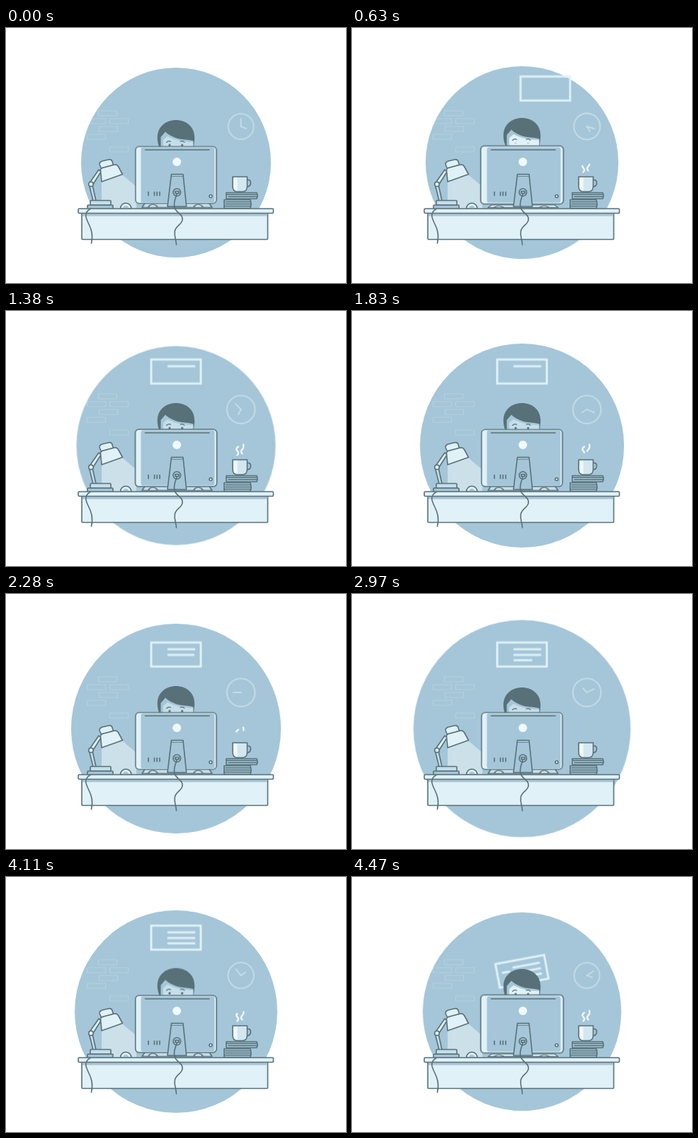
An HTML page for the animation above (4.5 s loop, 480 by 360 pixels).

```html
<!DOCTYPE html>
<html lang="en">
<head>
<meta charset="utf-8">
<title>Working at the desk</title>
<style>
  html, body { margin: 0; width: 100%; height: 100%; overflow: hidden; background: #fff; }
  svg { display: block; width: 100vw; height: 100vh; }
  svg * { transform-origin: 0 0; }

  .blue { fill: #a4c6d8; }
  .pale { fill: #e0f1f8; }
  .dark { fill: #587078; }
  .mid { fill: #c5deea; }
  .line { stroke: #587078; stroke-width: 1.6; stroke-linecap: round; stroke-linejoin: round; }
  .thin { stroke-width: 1.1; }
  .open { fill: none; }
  .bricks { fill: none; stroke: #fff; stroke-opacity: .2; stroke-width: 1.2; }
  .dial { fill: none; stroke: #c6deea; stroke-width: 1.8; stroke-linecap: round; }
  .paper { fill: none; stroke: #e0f1f8; stroke-width: 3; stroke-linecap: round; }
  .steam { fill: none; stroke: #eef8fc; stroke-width: 2.4; stroke-linecap: round; }

  .disc, .ring, .minute, .hour, .paper, .row, .note, .head, .face, .eyes, .shell, .feet, .steam path {
    animation: 4.5s linear infinite;
  }
  .disc { animation-name: swell; }
  .ring { animation-name: ring; }
  .minute { animation-name: minute; }
  .hour { animation-name: hour; }
  .paper { animation-name: hang; }
  .row { animation-name: row1; }
  .row.b { animation-name: row2; }
  .row.c { animation-name: row3; }
  .note { animation-name: note; }
  .head { animation-name: bob; }
  .face { animation-name: glow; }
  .eyes { animation-name: blink; }
  .shell { animation-name: stretch; }
  .feet { animation-name: squash; }
  .steam path { stroke-dasharray: 1 2; animation-name: rise; }

  @keyframes swell {
    0% { transform: scale(134); }
    12% { transform: scale(135.6); }
    24% { transform: scale(138.4); }
    36% { transform: scale(142.2); }
    48% { transform: scale(146.9); }
    60% { transform: scale(152.2); }
    64% { transform: scale(153.7); }
    66% { transform: scale(153.3); }
    72.7% { transform: scale(151); }
    80.7% { transform: scale(147); }
    96.7% { transform: scale(141); }
    100% { transform: scale(139.9); }
  }
  @keyframes ring {
    0% { transform: scale(.97); }
    14% { transform: scale(1); }
    30.7%, 66% { transform: scale(1.07); }
    80.7% { transform: scale(1); }
    100% { transform: scale(.97); }
  }
  @keyframes minute {
    0% { transform: rotate(0deg); }
    14% { transform: rotate(107deg); }
    30.7% { transform: rotate(316deg); }
    50.7% { transform: rotate(630deg); }
    66% { transform: rotate(783deg); }
    80.7% { transform: rotate(914deg); }
    100% { transform: rotate(1144deg); }
  }
  @keyframes hour {
    0% { transform: rotate(113deg); }
    14% { transform: rotate(150deg); }
    30.7% { transform: rotate(208deg); }
    50.7% { transform: rotate(270deg); }
    66% { transform: rotate(316deg); }
    80.7% { transform: rotate(340deg); }
    100% { transform: rotate(475deg); }
  }
  @keyframes hang {
    0%, 10% { transform: translate(70px, 0); opacity: 0; }
    12.7% { opacity: 1; }
    14% { transform: translate(33px, 0); }
    20%, 91% { transform: translate(0, 0); animation-timing-function: ease-in; }
    100% { transform: translate(0, 54px) rotate(-12deg); opacity: 1; }
  }
  @keyframes row1 {
    0%, 22% { transform: scaleX(0); opacity: 0; }
    22.1% { opacity: 1; }
    30%, 100% { transform: scaleX(1); opacity: 1; }
  }
  @keyframes row2 {
    0%, 41% { transform: scaleX(0); opacity: 0; }
    41.1% { opacity: 1; }
    51%, 100% { transform: scaleX(1); opacity: 1; }
  }
  @keyframes row3 {
    0%, 58% { transform: scaleX(0); opacity: 0; }
    58.1% { opacity: 1; }
    70%, 100% { transform: scaleX(1); opacity: 1; }
  }
  @keyframes note {
    0%, 92% { opacity: 0; }
    96%, 100% { opacity: 1; }
  }
  @keyframes bob {
    0% { transform: translateY(0); }
    14% { transform: translateY(-3px); }
    30.7%, 50.7% { transform: translateY(0); }
    66% { transform: translateY(2px); }
    80.7% { transform: translateY(-3px); }
    100% { transform: translateY(0); }
  }
  @keyframes glow {
    0%, 8% { fill: #c5deea; }
    13%, 16% { fill: #e0f1f8; }
    22%, 92% { fill: #c5deea; }
    98%, 100% { fill: #e0f1f8; }
  }
  @keyframes blink {
    0%, 12.5% { transform: scaleY(1); }
    13.5%, 14.7% { transform: scaleY(.15); }
    16%, 64.5% { transform: scaleY(1); }
    65.4%, 66.7% { transform: scaleY(.15); }
    68%, 100% { transform: scaleY(1); }
  }
  @keyframes stretch {
    0%, 6% { transform: scale(1); }
    14% { transform: scale(1.025); }
    30.7% { transform: scale(1.01); }
    42%, 90% { transform: scale(1); }
    98%, 100% { transform: scale(1.025); }
  }
  @keyframes squash {
    0%, 6% { transform: scaleY(1); }
    13%, 16% { transform: scaleY(.5); }
    22%, 92% { transform: scaleY(1); }
    98%, 100% { transform: scaleY(.5); }
  }
  @keyframes rise {
    0%, 6% { stroke-dashoffset: 1.15; opacity: 0; }
    7% { opacity: 1; }
    14% { stroke-dashoffset: .3; }
    26%, 34% { stroke-dashoffset: 0; }
    50.7% { stroke-dashoffset: -.72; opacity: 1; }
    58% { stroke-dashoffset: -1; opacity: 0; }
    72% { stroke-dashoffset: 1.15; opacity: 0; }
    73% { opacity: 1; }
    80.7% { stroke-dashoffset: .3; }
    100% { stroke-dashoffset: 0; opacity: 1; }
  }
</style>
</head>
<body>
<svg viewBox="0 0 480 360">
  <g transform="translate(240 190)"><circle class="disc blue" r="1"/></g>

  <path class="bricks" d="M130.5 117h26v7h-26zM114.5 128h26v7h-26zM146.5 128h26v7h-26zM131.5 139h26v7h-26zM114.5 150h26v7h-26zM146.5 168h26v7h-26z"/>

  <g class="dial" transform="translate(331.7 139)">
    <circle class="ring" r="18.5"/>
    <path class="minute" d="M0 0V-11"/>
    <path class="hour" d="M0 0V-8"/>
  </g>

  <g transform="translate(240 85.5)">
    <g class="paper">
      <rect x="-35" y="-17" width="70" height="34"/>
      <path class="note" d="M-27-3h9"/>
      <g transform="translate(-11 -7.5)"><path class="row" d="M0 0h37"/></g>
      <g transform="translate(-11 .5)"><path class="row b" d="M0 0h37"/></g>
      <g transform="translate(-11 8)"><path class="row c" d="M0 0h37"/></g>
    </g>
  </g>

  <!-- worker -->
  <g class="head">
    <path class="face" d="M217 146H264V175H217z"/>
    <path class="blue" d="M217 148L225 145 264 156V161Q244 161 228 153L222 158V175H217z"/>
    <path class="dark" d="M214 159C212 141 224 130 240 130S268 141 266 159L264.500 172V159.500C258 157 247 158.500 237 154Q229 150.500 225 146.500L218.500 154V172Q215 167 214 159z"/>
    <path class="line thin open" d="M226.500 161.500q3-3 6-1.200M246 160.300q3.500-1.800 6 1.200"/>
    <g transform="translate(240 165.500)">
      <g class="eyes dark"><circle cx="-9" r="1.700"/><circle cx="8.700" r="1.700"/></g>
    </g>
  </g>

  <!-- lamp and mouse -->
  <path fill="#cbe0e8" d="M135 216L164 207 184 224V255H135z"/>
  <path class="pale line" d="M161.500 255a7.700 7.700 0 0 1 15.400 0z"/>
  <path class="blue" d="M165 255a4.200 4.200 0 0 1 8.400 0z"/>
  <g class="line">
    <path class="mid" d="M123 244L117.500 222 121.500 219 127 244z"/>
    <path class="pale" d="M118.500 218L131 200 134 203 122 222z"/>
    <circle class="pale" cx="120" cy="220.500" r="3.300"/>
    <path class="pale" d="M134.500 198L132.200 193Q131.500 189.500 135.500 188L145 185.700Q149 185 150 188.500L151.500 193.500z"/>
    <path class="pale" d="M133.500 201Q133 198.500 137 197.200L153 193Q156.500 192.300 158.500 195.500L164.500 206.500 135 217z"/>
    <rect class="mid" x="119" y="243.500" width="29" height="6.500" rx="1"/>
    <rect class="blue" x="115" y="250" width="36" height="5.500" rx="1"/>
  </g>

  <!-- monitor -->
  <g transform="translate(0 253.500)">
    <g class="feet line">
      <path class="mid" d="M197-7.500L192 0H291L286-7.500z"/>
      <path class="pale" d="M201-1q6-7 13 0M265-1q6-7 13 0"/>
    </g>
  </g>
  <g transform="translate(240.300 207.500)">
    <rect class="shell pale line" x="-57.300" y="-40" width="114" height="80" rx="5"/>
  </g>
  <rect class="pale" x="184" y="168.500" width="112" height="78" rx="4"/>
  <rect class="blue" x="190.500" y="168.500" width="104" height="78" rx="3"/>
  <path class="line open" d="M196.500 172H287"/>
  <circle fill="#f0f9fd" cx="241.200" cy="189" r="6"/>
  <path class="line open" d="M201 231.500v5M209.500 231.500v5M213.200 231.500v5M217 231.500v5"/>
  <circle class="pale line" cx="289" cy="237.500" r="2"/>
  <path class="line blue" d="M233.500 206.500H250L254.700 252H228z"/>
  <path class="line open" style="stroke-width:.7" d="M234 209.500H249.500"/>

  <!-- cup and books -->
  <g class="steam">
    <path pathLength="1" d="M326.500 203.500q3-3 0-6t1.500-6"/>
    <path pathLength="1" d="M333.500 201.500q-3-3 0-6t1.500-7"/>
  </g>
  <g class="line">
    <path class="open" d="M340 214.500h2q3.500 0 3.500 4.500t-6 5.500"/>
    <path fill="#d3e7f0" d="M320 210H340.500V224Q340 231 334 231H326Q320.500 231 320 224z"/>
    <path fill="#f0f9fd" stroke="none" d="M321 211H326.500V230Q321 229 321 224z"/>
    <path class="blue" d="M311 232.500H354q2 4 0 8.500H311z"/>
    <path class="open" d="M312 235H354M314 238H354"/>
    <path class="blue" d="M308 242.500H345q2 6 0 12H308z"/>
    <path class="open" d="M310 245.500H345M310 248.500H345M308 251.500H345"/>
  </g>

  <!-- desk -->
  <rect class="pale line" x="107" y="259" width="262.500" height="39.500" rx="1"/>
  <path fill="#a8c3d3" d="M108 262H369V265.500H108z"/>
  <rect class="pale line" x="102" y="255" width="275.500" height="6.500" rx="1.500"/>
  <path class="line open" d="M119 255.500C109 261 113 269 117 277S123 292 120.500 304"/>
  <circle class="blue line" cx="241.300" cy="232" r="5.300"/>
  <path class="line open" d="M239 230.500h5v3h-5zM241.500 233.500C239 241 235 250 239.500 256.500S250 264 249 271 239.500 279 238.300 287 240.500 299 240.500 306"/>
</svg>
</body>
</html>
```
